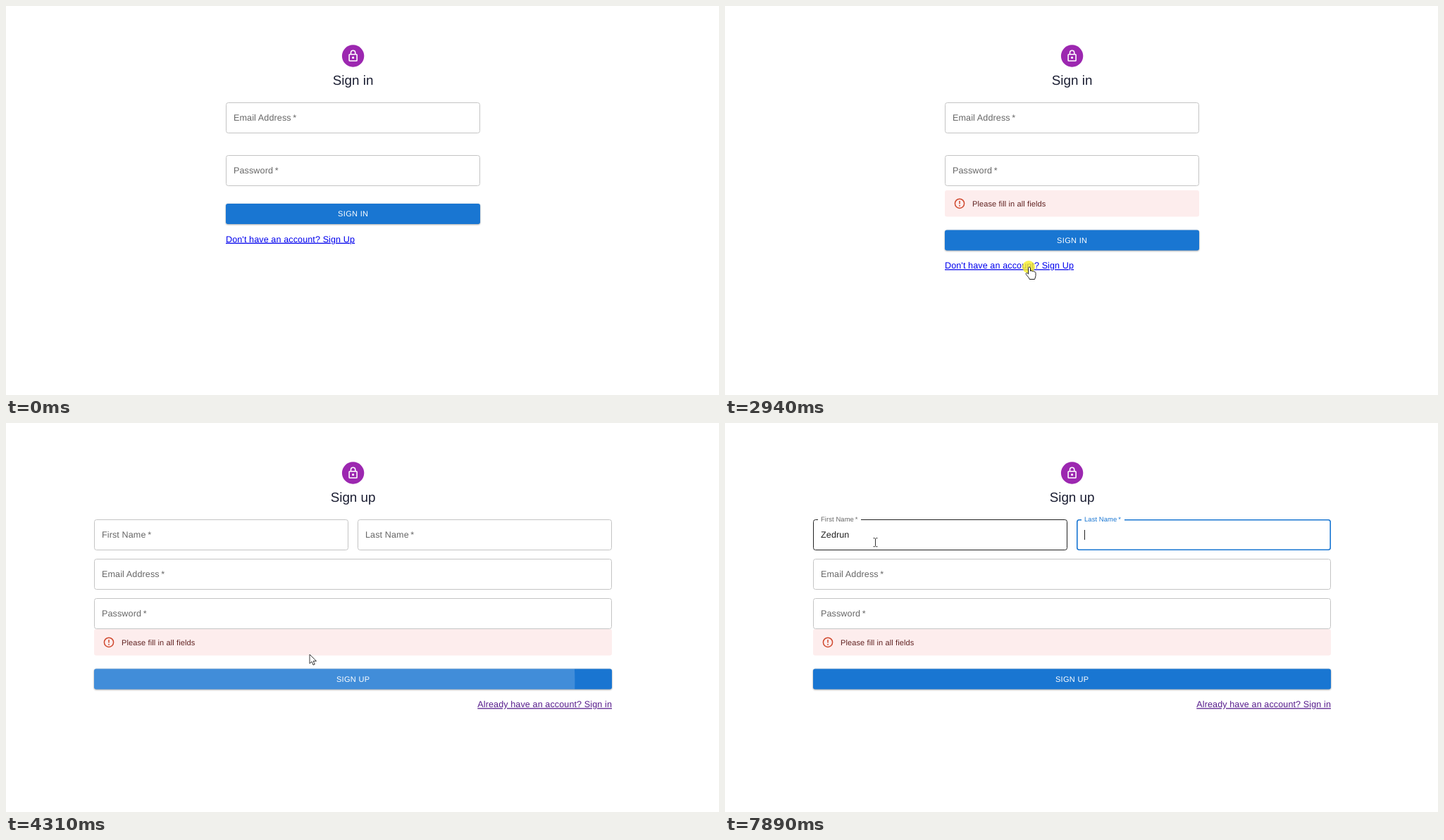
These frames come from a looping animation (1012x553 px, 8 s). An HTML page:

```html
<!DOCTYPE html>
<html lang="en">
<head>
<meta charset="utf-8">
<title>Sign in</title>
<style>
  html, body { margin: 0; width: 100%; height: 100%; overflow: hidden; background: #fff; }
  #stage { display: block; width: 1012px; height: 553px; }
  text {
    font: 12.56px "Liberation Sans", Arial, sans-serif;
    letter-spacing: .00938em;
    text-rendering: geometricPrecision;
  }
  .title { font-size: 18.84px; letter-spacing: 0; fill: #1c1f33; text-anchor: middle; }
  .caption { font-size: 11px; letter-spacing: .02857em; fill: #fff; text-anchor: middle; }
  .alert { font-size: 11px; letter-spacing: .01071em; fill: #5f2120; }
  .link { text-decoration: underline; }
  .value { fill: #212121; }
</style>
</head>
<body>
<svg id="stage" viewBox="0 0 1012 553"></svg>
<script>
const LOOP = 8000;
const PAGE_SWITCH = 3030;
const FIRST_FOCUS = 5288, LAST_FOCUS = 7660;
const NAME = 'Zedrun';
const KEY_TIMES = [6670, 6950, 7030, 7100, 7250, 7380];
const CLICKS = [[1420, 1570], [2930, 3030], [3980, 4145], [FIRST_FOCUS, 5470]];
const BUTTON_HOVERS = [[900, 1570], [2380, 2580], [3570, 4145]];
const POINTER = [
  [190, 842, 503], [920, 522, 304], [1150, 515, 300], [2270, 515, 300],
  [2720, 432, 371], [3480, 432, 371], [3730, 432, 330], [3900, 431, 329],
  [4780, 431, 329], [5230, 213.5, 169.7]
];
const CURSORS = {
  arrow: '<path d="M0 0V13l3-2.8 2 4.8 2.2-.9-2-4.7h4.3z" fill="#fff" stroke="#222" stroke-width=".9"/>',
  hand: `<path d="M-1.5 10V1.5C-1.5-.4 1.5-.4 1.5 1.5V6c.3-1 2.6-.9 2.8.4.5-.8 2.4-.6 2.6.7
    .8-.6 2.1-.1 2.1 1.2v4.2c0 2-1.3 3-1.4 5H.2C0 15.5-3 13-4.6 10.6-5.6 9-3.8 7.8-2.6 9z"
    fill="#fff" stroke="#222"/>`,
  beam: '<path d="M-3-6h2l1 .8 1-.8h2M0-5V5M-3 6h2l1-.8 1 .8h2" fill="none" stroke="#333"/>'
};

const stage = document.getElementById('stage');
const measure = document.createElement('canvas').getContext('2d');
measure.font = '12.56px "Liberation Sans", Arial, sans-serif';

const clamp = v => Math.min(1, Math.max(0, v));
const mix = (a, b, k) => a + (b - a) * k;
const color = (a, b, k) => `rgb(${a.map((v, i) => Math.round(mix(v, b[i], k)))})`;
const within = (t, [from, to]) => t >= from && t < to;

// cubic-bezier(x1, 0, .2, 1)
function ease(u, x1 = .4) {
  u = clamp(u);
  let lo = 0, hi = 1, s = u;
  for (let i = 0; i < 18; i++) {
    s = (lo + hi) / 2;
    const x = 3 * x1 * s * (1 - s) ** 2 + .6 * s * s * (1 - s) + s ** 3;
    if (x < u) lo = s; else hi = s;
  }
  return u === 0 || u === 1 ? u : s * s * (3 - 2 * s);
}
const span = (t, on, off, length, x1) =>
  ease((t - on) / length, x1) - ease((t - off) / length, x1);

function pointerAt(t) {
  const i = POINTER.findIndex(p => p[0] > t);
  if (i === 0) return null;
  if (i < 0) return POINTER.at(-1).slice(1);
  const [t0, x0, y0] = POINTER[i - 1], [t1, x1, y1] = POINTER[i];
  const u = (t - t0) / (t1 - t0);
  const k = i === 1 ? 1 - (1 - u) ** 2 : u * u * (3 - 2 * u);
  return [mix(x0, x1, k), mix(y0, y1, k)];
}
const inside = (p, x, y, w, h) => p && p[0] >= x && p[0] <= x + w && p[1] >= y && p[1] <= y + h;

function field({ x, y, w, label, shrink = 0, tint = 0, focused, value = '', caret }, hovered) {
  const stroke = focused ? '#1976d2' : hovered ? '#212121' : '#c4c4c4';
  const inset = focused ? .8 : .5;
  const gap = 61 * clamp(shrink * 1.6);
  const caretX = x + 11.5 + measure.measureText(value).width + value.length * .118;
  return `<rect x="${x + inset}" y="${y + inset}" width="${w - 2 * inset}" height="${44 - 2 * inset}"
      rx="3" fill="none" stroke="${stroke}" stroke-width="${2 * inset}"/>
    <rect x="${x + 7}" y="${y - 1}" width="${gap}" height="3.5" fill="#fff"/>
    <text transform="translate(${x + 11} ${mix(y + 25.6, y + 2.9, shrink)}) scale(${mix(1, .75, shrink)})"
      fill="${color([102, 102, 102], [25, 118, 210], tint)}">${label}\u2009*</text>
    <text class="value" x="${x + 11}" y="${y + 26.3}">${value}</text>
    ${caret ? `<path d="M${caretX} ${y + 15}v14" stroke="#222"/>` : ''}`;
}

function alertBox(x, y, w) {
  return `<rect x="${x}" y="${y}" width="${w}" height="37.5" rx="3" fill="#fdeded"/>
    <g transform="translate(${x + 21} ${y + 18.8})" fill="none" stroke="#d0492f" stroke-width="1.5">
      <circle r="6.6"/><path d="M0-3.9V.8M0 2.3v1.6"/></g>
    <text class="alert" x="${x + 39}" y="${y + 22.7}">Please fill in all fields</text>`;
}

function button(t, x, y, w, caption, clickX, [down, up]) {
  const hover = BUTTON_HOVERS.reduce((sum, [on, off]) => sum + span(t, on, off, 250), 0);
  const grow = ease((t - down) / 550);
  const fade = 1 - ease((t - up) / 550);
  const reach = Math.max(clickX - x, x + w - clickX);
  const ripple = t >= down && fade > 0
    ? `<svg x="${x}" y="${y}" width="${w}" height="29"><circle cx="${clickX - x}" cy="18"
        r="${reach * grow}" fill="#fff" opacity="${mix(.1, .3, grow) * fade}"/></svg>` : '';
  const shadow = `drop-shadow(0 ${mix(1, 1.4, hover)}px ${mix(.8, 1.4, hover)}px rgba(0,0,0,.28))
    drop-shadow(0 .6px ${mix(1, 1.8, hover)}px rgba(0,0,0,.12))`;
  return `<rect x="${x}" y="${y}" width="${w}" height="29" rx="3"
      fill="${color([25, 118, 210], [21, 101, 192], hover)}" style="filter:${shadow}"/>${ripple}
    <text class="caption" x="492.7" y="${y + 18}">${caption}</text>`;
}

function signIn(t) {
  const click = CLICKS[0], failed = t >= click[1];
  return {
    title: 'Sign in', caption: 'SIGN IN', x: 312, w: 361, click, clickX: 515,
    alertY: failed && 262, buttonY: failed ? 318.5 : 281,
    link: { text: "Don't have an account? Sign Up", x: 312, w: 183, anchor: 'start', fill: '#0000ee' },
    fields: [
      { x: 312, y: 137, w: 361, label: 'Email Address' },
      { x: 312, y: 212, w: 361, label: 'Password' }
    ]
  };
}

function signUp(t) {
  const click = CLICKS[2], failed = t >= click[1];
  const auto = span(t, PAGE_SWITCH, click[0], 200, 0);
  const last = ease((t - LAST_FOCUS) / 200, 0);
  const firstFocused = t < click[0] || within(t, [FIRST_FOCUS, LAST_FOCUS]);
  const blinkOff = within(t, [3540, 4040]) || within(t, [5890, 6390]);
  return {
    title: 'Sign up', caption: 'SIGN UP', x: 125, w: 735, click, clickX: 431,
    alertY: failed && 293, buttonY: failed ? 349.5 : 312,
    link: { text: 'Already have an account? Sign in', x: 670, w: 190, anchor: 'end', fill: '#551a8b' },
    fields: [
      {
        x: 125, y: 137, w: 361, label: 'First Name',
        shrink: auto + ease((t - FIRST_FOCUS) / 200, 0),
        tint: auto + span(t, FIRST_FOCUS, LAST_FOCUS, 200, 0),
        focused: firstFocused, caret: firstFocused && !blinkOff,
        value: NAME.slice(0, KEY_TIMES.filter(k => t >= k).length)
      },
      {
        x: 499, y: 137, w: 361, label: 'Last Name', shrink: last, tint: last,
        focused: t >= LAST_FOCUS, caret: t >= LAST_FOCUS
      },
      { x: 125, y: 193, w: 735, label: 'Email Address' },
      { x: 125, y: 249, w: 735, label: 'Password' }
    ]
  };
}

function render(t) {
  const page = t < PAGE_SWITCH ? signIn(t) : signUp(t);
  const { x, w, link, buttonY, alertY } = page;
  const pointer = pointerAt(t);
  const overField = f => inside(pointer, f.x, f.y, f.w, 44);
  const linkY = buttonY + 54.7;
  const kind = page.fields.some(overField) ? 'beam'
    : inside(pointer, x, buttonY, w, 29) || inside(pointer, link.x, linkY - 12, link.w, 15) ? 'hand' : 'arrow';

  return `<circle cx="492.6" cy="71" r="15.7" fill="#9c27b0"/>
    <g transform="translate(483.2 61.6) scale(.785)" fill="none" stroke="#fff" stroke-width="2">
      <rect x="5" y="9" width="14" height="12" rx="1"/>
      <path d="M8 9V6a4 4 0 0 1 8 0v3"/>
      <circle cx="12" cy="15" r="2" fill="#fff" stroke="none"/></g>
    <text class="title" x="492.6" y="112">${page.title}</text>
    ${page.fields.map(f => field(f, overField(f))).join('')}
    ${alertY ? alertBox(x, alertY, w) : ''}
    ${button(t, x, buttonY, w, page.caption, page.clickX, page.click)}
    <text class="link" x="${link.anchor === 'end' ? link.x + link.w : link.x}" y="${linkY}"
      text-anchor="${link.anchor}" fill="${link.fill}">${link.text}</text>
    ${pointer ? `<g transform="translate(${pointer})">
      ${CLICKS.some(c => within(t, c)) ? '<circle cx="-1" r="9" fill="#f8ee28" opacity=".8"/>' : ''}
      ${CURSORS[kind]}</g>` : ''}`;
}

let shown = '';
function tick() {
  const markup = render(performance.now() % LOOP);
  if (markup !== shown) stage.innerHTML = shown = markup;
  requestAnimationFrame(tick);
}
tick();
</script>
</body>
</html>
```
